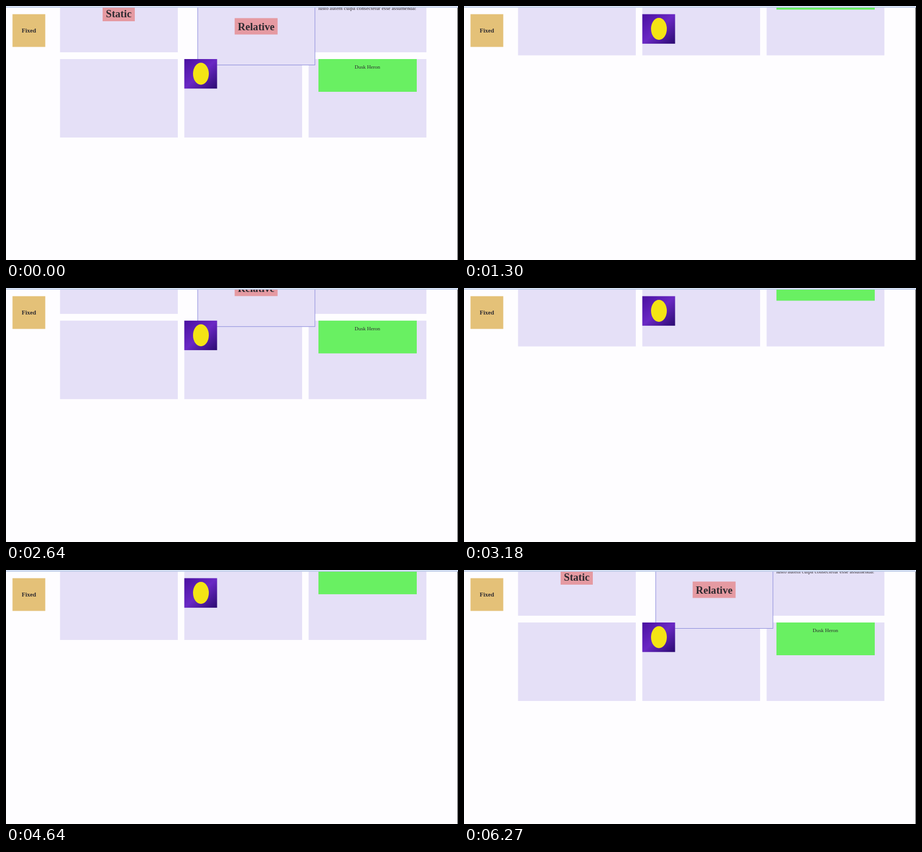
Animation of 800x450 px, one loop 6.3 s. Source, as an HTML page:

```html
<!DOCTYPE html>
<html lang="en">
<head>
<meta charset="utf-8">
<title>CSS positions</title>
<style>
  html, body { margin: 0; width: 100%; height: 100%; overflow: hidden; background: #fefdff; }
  svg { display: block; width: 800px; height: 450px; }
  text { font-family: "Liberation Serif", "Times New Roman", serif; font-size: 9.28px; fill: #2d2a30; text-anchor: middle; }
  .title { font-size: 18.56px; font-weight: bold; }
  .fixed { font-size: 10.7px; font-weight: bold; }
  .cell { fill: #e5e0f7; }
  .tag { fill: #e59aa2; }
</style>
</head>
<body>
<svg viewBox="0 0 800 450">
  <defs>
    <linearGradient id="night" x2="1" y2="1">
      <stop offset="0" stop-color="#4a10a0"/>
      <stop offset=".5" stop-color="#6a28c4"/>
      <stop offset="1" stop-color="#2a0a70"/>
    </linearGradient>
  </defs>

  <!-- y = 0 is the lower edge of the grid -->
  <g id="page">
    <g id="cells"></g>
    <rect class="tag" x="171" y="-235" width="57" height="29"/>
    <text class="title" x="199.5" y="-213.5">Static</text>
    <text x="639.6" y="-225.6">iusto autem culpa consectetur esse assumenda!</text>
    <rect class="cell" x="339.3" y="-266.5" width="207.5" height="138" stroke="#8f8fdc"/>
    <rect class="tag" x="404.7" y="-211.5" width="76" height="29"/>
    <text class="title" x="442.8" y="-190.3">Relative</text>
    <rect x="553" y="-139" width="174" height="58" fill="#69f062"/>
    <text x="639.6" y="-121.6">Dusk Heron</text>
  </g>

  <g id="sticky">
    <rect x="315.6" width="58" height="52.3" fill="url(#night)"/>
    <ellipse cx="345" cy="26" rx="14" ry="19.5" fill="#f4e414"/>
  </g>

  <rect x="11.5" y="14.5" width="58" height="58" fill="#e4c178"/>
  <text class="fixed" x="40.5" y="47.3">Fixed</text>

  <path d="M0 1H800" stroke="#d9e4f6" stroke-width="2"/>
  <path d="M0 2.5H800" stroke="#b4c4e4"/>
  <path d="M799.5 3V450" stroke="#3a3a3e"/>
</svg>
<script>
const LOOP = 6300, STEP = 30, STICKY_TOP = 14.5;
const page = document.getElementById('page');
const sticky = document.getElementById('sticky');

document.getElementById('cells').innerHTML = [[0, 0], [2, 0], [0, 1], [1, 1], [2, 1]].map(([col, row]) =>
  `<rect class="cell" x="${95.6 + col * 220}" y="${row * 151 - 290}" width="208.5" height="139"/>`).join('');

// [time, position of the grid's lower edge]
const keys = [
  [0, 233], [640, 107], [980, 64], [1300, 88.5], [1940, 191], [2030, 204],
  [2190, 212.5], [2580, 201], [3180, 103.5], [3240, 91], [3600, 54], [3900, 43],
  [4120, 40], [4520, 102], [5000, 211.5], [5180, 225.5], [5790, 232], [LOOP, 232]
];

const rate = i => (keys[i + 1][1] - keys[i][1]) / (keys[i + 1][0] - keys[i][0]);

// Flat at turning points, harmonic mean of the neighbours elsewhere
function slope(i) {
  if (i === 0 || i === keys.length - 1) return 0;
  const a = rate(i - 1), b = rate(i);
  return a * b > 0 ? 2 * a * b / (a + b) : 0;
}

function edgeAt(t) {
  const i = keys.findIndex((k, n) => t < keys[n + 1][0]);
  const [t0, y0] = keys[i], [t1, y1] = keys[i + 1];
  const h = t1 - t0, u = (t - t0) / h, v = 1 - u;
  return v * v * ((1 + 2 * u) * y0 + u * h * slope(i)) +
         u * u * ((3 - 2 * u) * y1 - v * h * slope(i + 1));
}

function moveTo(el, y) {
  el.setAttribute('transform', `translate(0 ${y.toFixed(2)})`);
}

function draw() {
  const t = performance.now() % LOOP;
  const edge = edgeAt(Math.floor(t / STEP) * STEP);
  moveTo(page, edge);
  moveTo(sticky, Math.min(Math.max(edge - 139, STICKY_TOP), edge - 52.3));
  requestAnimationFrame(draw);
}
draw();
</script>
</body>
</html>
```
